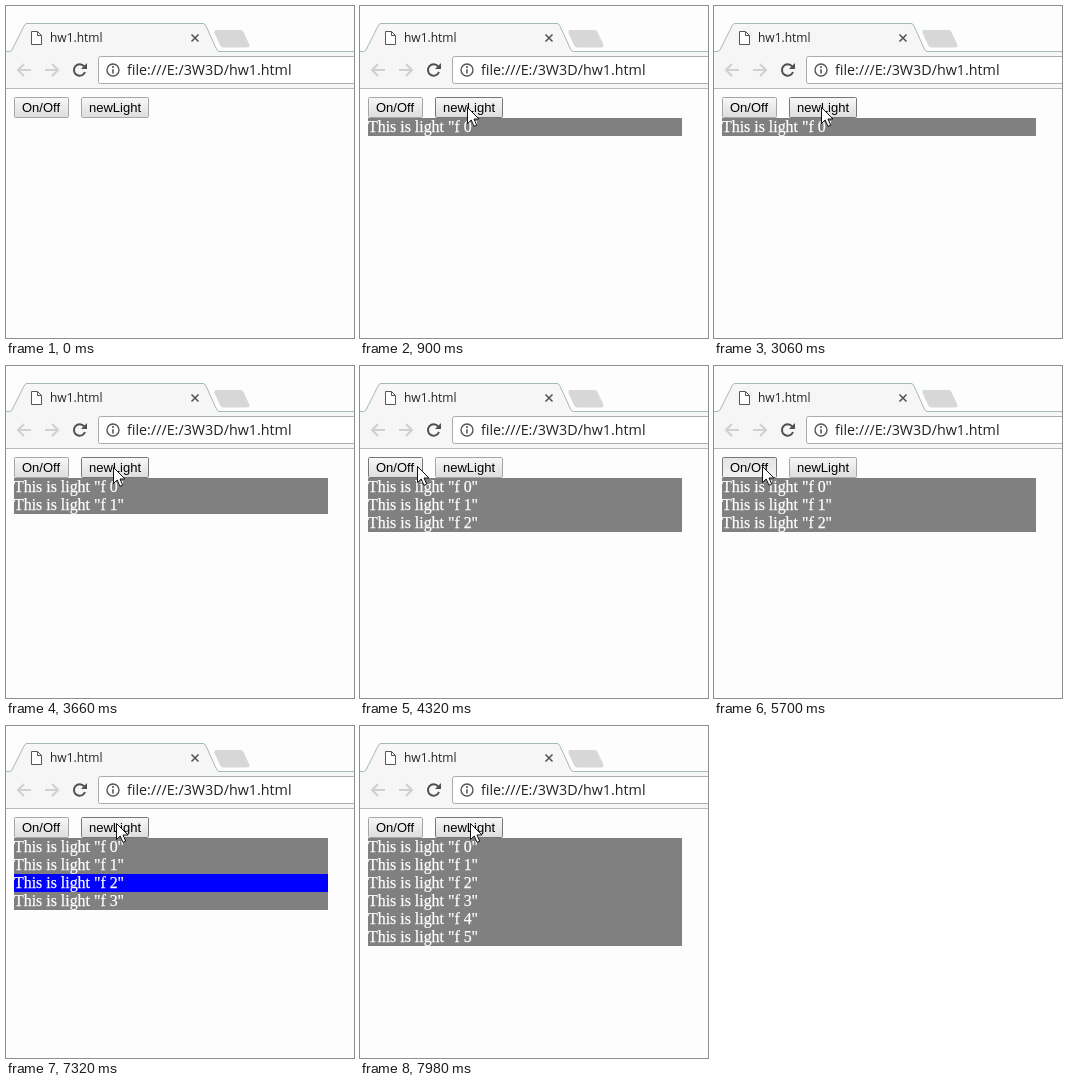
Recreate the animation shown at these times as an HTML page. Size 348 by 332 pixels, loop 8 s.

```html
<!DOCTYPE html>
<html lang="en">
<head>
<meta charset="utf-8">
<title>Lights</title>
<style>
html, body { margin: 0; width: 100%; height: 100%; overflow: hidden; background: #fdfdfd; }
svg { display: block; }
.ui { font-family: "Open Sans", sans-serif; fill: #222; }
.button text { font: 13px "Liberation Sans", Arial, sans-serif; fill: #000; }
.button rect { fill: url(#idle); stroke: #a6a6a6; }
.button.hover rect { stroke: #777; }
.button.down rect { fill: url(#down); stroke: #777; }
.row text { font: 15.9px "Liberation Serif", Times, serif; fill: #fff; stroke: #fff; stroke-width: .25px; }
</style>
</head>
<body>
<svg width="348" height="332" viewBox="0 0 348 332">
  <defs>
    <linearGradient id="idle" x2="0" y2="1"><stop stop-color="#f8f8f8"/><stop offset="1" stop-color="#ddd"/></linearGradient>
    <linearGradient id="down" x2="0" y2="1"><stop stop-color="#e4e4e4"/><stop offset="1" stop-color="#f2f2f2"/></linearGradient>
  </defs>

  <!-- Browser frame -->
  <path d="M0 45.5H348V82.5H0Z" fill="#f5f6f5"/>
  <path d="M-1 45.5H4Q6 45 7 42L18 20Q19 17.500 21 17.500H197Q199 17.500 200 20L210 42Q211 45 213 45.500H349" fill="#f5f6f5" stroke="#a3bbb5"/>
  <path d="M0 82.500H348" stroke="#b4bbb8"/>
  <path d="M210 24H234Q237 24 238 27L243.500 39Q244 41.500 241 41.500H218Q215 41.500 214 39L208.500 27Q208 24 210 24Z" fill="#d7d7d7"/>
  <path d="M25.500 25.500H31.500L35.500 29.500V38.500H25.500ZM31.500 25.500V29.500H35.500" fill="#fff" stroke="#555"/>
  <text class="ui" x="44" y="36" font-size="12">hw1.html</text>
  <path d="M185.500 28.500L192.500 35.500M192.500 28.500L185.500 35.500" stroke="#555" stroke-width="1.600"/>
  <g fill="none" stroke-width="2">
    <path d="M25 64H12M18 58L12 64L18 70M39 64H52M46 58L52 64L46 70" stroke="#d0d0d0"/>
    <path d="M78.200 60.500A5.700 5.700 0 1 0 79 66" stroke="#505050"/>
  </g>
  <path d="M81 57V63H75Z" fill="#505050"/>
  <rect x="92.500" y="50.500" width="270" height="27" rx="2" fill="#fff" stroke="#a9aeac"/>
  <circle cx="107" cy="64" r="6" fill="none" stroke="#555" stroke-width="1.400"/>
  <path d="M107 60V62M107 63.300V67.500" stroke="#555" stroke-width="1.600"/>
  <text class="ui" x="121" y="69" font-size="14.300">file:///E:/3W3D/hw1.html</text>

  <!-- Page -->
  <g class="button"><rect x="8.500" y="91.500" width="54" height="20" rx="1"/><text x="16" y="106">On/Off</text></g>
  <g class="button"><rect x="75.500" y="91.500" width="67" height="20" rx="1"/><text x="83" y="106">newLight</text></g>
  <g id="rows"></g>
  <path id="pointer" d="M.5 .5V16.500L4.200 13L7 19.300L9.700 18.200L7 12H12Z" fill="#fff" stroke="#111"/>
</svg>
<script>
const LOOP = 8000, STEP = 60, BLINK = 300, CHASE = 360;

// Pointer moves: start, end, then where it rests
const moves = [
  [240, 420, 213, 93], [420, 780, 107, 101], [1080, 1500, 34, 105],
  [1920, 2820, 107, 101], [4140, 4440, 48, 100], [6420, 6900, 110, 97]
];
// Press times; a press acts when it is released after `hold`
const onOff = { left: 8, right: 63, hold: 120, presses: [1680, 4560, 5700] };
const newLight = { left: 75, right: 143, hold: 60, presses: [840, 3540, 3960, 7140, 7440, 7920] };
const colors = ["red", "lime", "blue"];

const buttons = document.querySelectorAll(".button");
const pointer = document.getElementById("pointer");
const rowBox = document.getElementById("rows");
rowBox.innerHTML = newLight.presses.map((_, i) =>
  `<g class="row" transform="translate(8 ${112 + 18 * i})"><rect width="314" height="18"/><text y="14">This is light "f ${i}"</text></g>`).join("");
const rows = [...rowBox.children];

function place(t) {
  let x = 212, y = 54;
  for (const [start, end, toX, toY] of moves) {
    const k = Math.min(1, Math.max(0, (t - start) / (end - start)));
    const ease = 1 - (1 - k) ** 2;
    x += (toX - x) * ease;
    y += (toY - y) * ease;
  }
  return [Math.round(x), Math.round(y)];
}

const released = (button, t) => button.presses.filter(p => t >= p + button.hold).length;

// A single light blinks; three lights take turns until a new one resets them.
function litRow(t) {
  const clicks = released(onOff, t);
  if (clicks === 1) return Math.floor((t - 2160) / BLINK) % 2 ? -1 : 0;
  if (clicks < 3 || t < 6120 || released(newLight, t) === 6) return -1;
  return t < 7740 ? Math.min(2, Math.floor((t - 6120) / CHASE)) : 1;
}

function draw(now) {
  const t = Math.floor(now % LOOP / STEP) * STEP;
  const [x, y] = place(t), shown = t >= 240;
  pointer.style.display = shown ? "" : "none";
  pointer.setAttribute("transform", `translate(${x} ${y})`);

  [onOff, newLight].forEach(({ left, right, hold, presses }, i) => {
    const over = shown && x >= left && x < right && y >= 91 && y < 112;
    const down = presses.some(p => t >= p && t < p + hold);
    buttons[i].setAttribute("class", "button" + (down ? " down" : over ? " hover" : ""));
  });

  const lit = litRow(t), count = released(newLight, t);
  rows.forEach((row, i) => {
    row.style.display = i < count ? "" : "none";
    row.firstChild.setAttribute("fill", i === lit ? colors[i] : "#808080");
  });
}

const start = performance.now();
function frame() {
  draw(performance.now() - start);
  requestAnimationFrame(frame);
}
frame();
</script>
</body>
</html>
```
